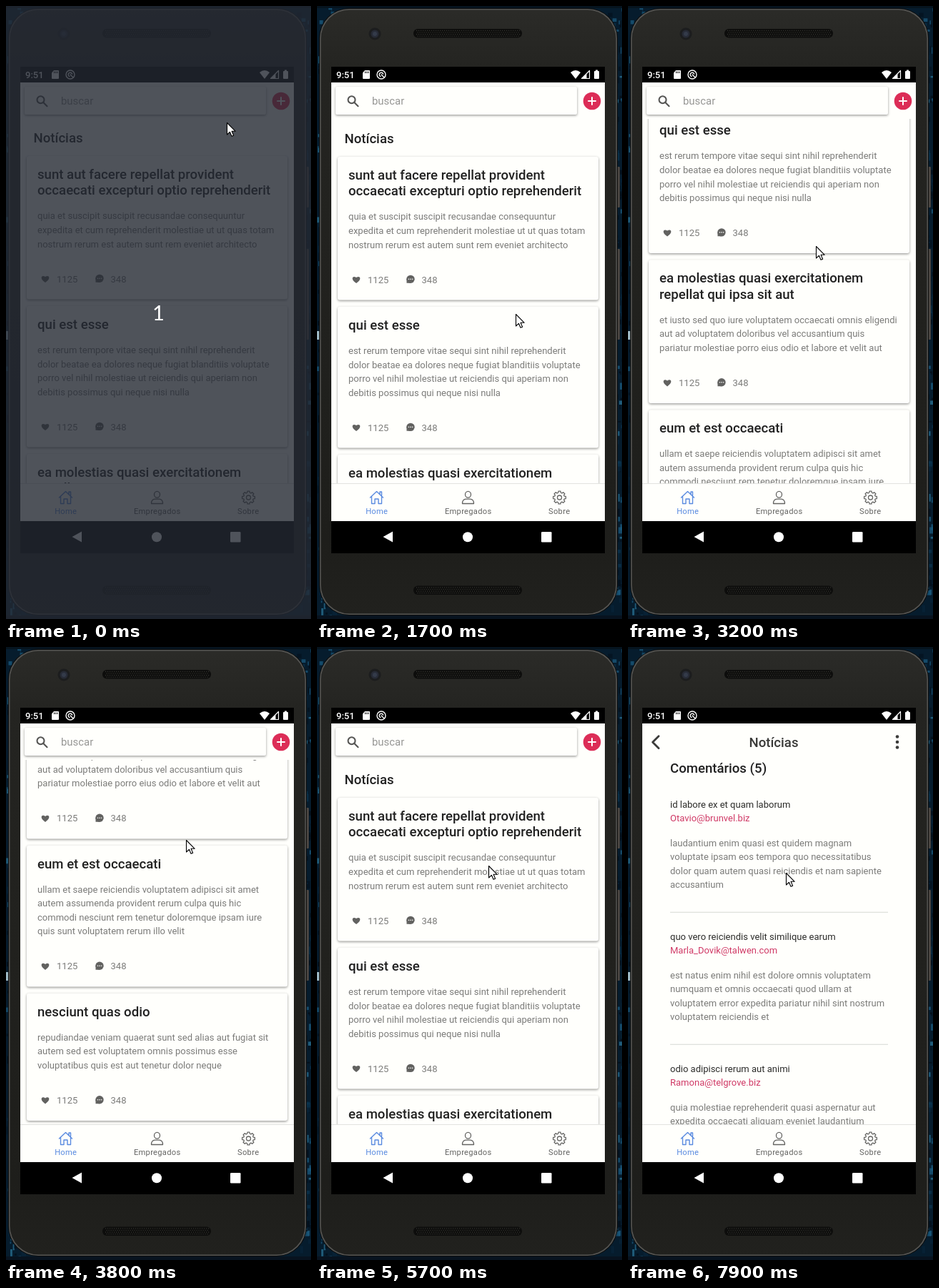
Recreate the animation shown at these times as an HTML page with a canvas. Size 427 by 858 pixels, loop 8000 ms.

```html
<!DOCTYPE html>
<html lang="pt">
<head>
<meta charset="utf-8">
<title>Notícias</title>
<style>
html, body { margin: 0; width: 100%; height: 100%; overflow: hidden; background: #051a2a; }
canvas { display: block; width: 427px; height: 858px; }
</style>
</head>
<body>
<canvas id="stage" width="427" height="858"></canvas>
<script>
const LOOP = 8000, STEP = 100;
const PAGE = '#fffffc', INK = '#212121', GREY = '#7b7b79', ICON = '#656563', PINK = '#d03a66', BLUE = '#5a8be0';
const BODY_LINE = 19.55, TITLE_LINE = 22.34;
const stage = document.getElementById('stage').getContext('2d');
let c = stage;

const posts = [
  ['sunt aut facere repellat provident|occaecati excepturi optio reprehenderit',
   'quia et suscipit suscipit recusandae consequuntur|expedita et cum reprehenderit molestiae ut ut quas totam|nostrum rerum est autem sunt rem eveniet architecto'],
  ['qui est esse',
   'est rerum tempore vitae sequi sint nihil reprehenderit|dolor beatae ea dolores neque fugiat blanditiis voluptate|porro vel nihil molestiae ut reiciendis qui aperiam non|debitis possimus qui neque nisi nulla'],
  ['ea molestias quasi exercitationem|repellat qui ipsa sit aut',
   'et iusto sed quo iure voluptatem occaecati omnis eligendi|aut ad voluptatem doloribus vel accusantium quis|pariatur molestiae porro eius odio et labore et velit aut'],
  ['eum et est occaecati',
   'ullam et saepe reiciendis voluptatem adipisci sit amet|autem assumenda provident rerum culpa quis hic|commodi nesciunt rem tenetur doloremque ipsam iure|quis sunt voluptatem rerum illo velit'],
  ['nesciunt quas odio',
   'repudiandae veniam quaerat sunt sed alias aut fugiat sit|autem sed est voluptatem omnis possimus esse|voluptatibus quis est aut tenetur dolor neque'],
  ['dolorem eum magni eos aperiam quia',
   'ut aspernatur corporis harum nihil quis provident sequi|mollitia nobis aliquid molestiae perspiciatis et ea nemo|ab reprehenderit accusantium quas voluptate dolores']
].map(p => p.map(s => s.split('|')));

const article = [
  ['sunt aut facere repellat', 'provident occaecati excepturi', 'optio reprehenderit'],
  ['quia et suscipit suscipit recusandae', 'consequuntur expedita et cum reprehenderit',
   'molestiae ut ut quas totam nostrum rerum est', 'autem sunt rem eveniet architecto']
];

const comments = [
  ['id labore ex et quam laborum', 'Otavio@brunvel.biz',
   'laudantium enim quasi est quidem magnam|voluptate ipsam eos tempora quo necessitatibus|dolor quam autem quasi reiciendis et nam sapiente|accusantium'],
  ['quo vero reiciendis velit similique earum', 'Marla_Dovik@talwen.com',
   'est natus enim nihil est dolore omnis voluptatem|numquam et omnis occaecati quod ullam at|voluptatem error expedita pariatur nihil sint nostrum|voluptatem reiciendis et'],
  ['odio adipisci rerum aut animi', 'Ramona@telgrove.biz',
   'quia molestiae reprehenderit quasi aspernatur aut|expedita occaecati aliquam eveniet laudantium|omnis quibusdam delectus saepe quia accusamus|maiores nam est']
];

// Key rows are [time, value, ...]; values between rows are linear.
const listKeys = [[0, 1], [1400, 1], [1500, 0], [2000, 0], [2400, 4], [2600, 4], [2700, 22], [2800, 52.5],
  [3000, 170], [3200, 272.5], [3500, 410], [3800, 560], [4000, 590], [4100, 570], [4200, 497.5],
  [4300, 230], [4400, 1.5], [4500, 1], [4700, 0]];
const pageKeys = [[7300, 0], [7900, 250]];
const mouseKeys = [[0, 309, 163], [800, 309, 163], [1700, 278, 431], [2000, 278, 431], [2400, 264, 540],
  [2600, 264, 540], [2800, 262, 491], [3000, 262, 400], [3200, 263, 336], [3500, 258, 300], [3800, 252, 270],
  [4100, 250, 290], [4200, 250, 361], [4300, 250, 600], [4400, 250, 806], [4600, 248, 806], [5200, 241, 459],
  [5300, 241, 459], [5700, 240, 306], [7000, 240, 306], [7100, 218, 310], [7200, 218, 310],
  [7300, 222, 566], [7900, 221, 316]];

function at(keys, t) {
  let i = 0;
  while (i < keys.length && keys[i][0] <= t) i++;
  if (i === 0) return keys[0].slice(1);
  if (i === keys.length) return keys[i - 1].slice(1);
  const a = keys[i - 1], b = keys[i], k = (t - a[0]) / (b[0] - a[0]);
  return a.slice(1).map((v, j) => v + (b[j + 1] - v) * k);
}

function seeded(seed) {
  return () => (seed = (seed * 16807) % 2147483647) / 2147483647;
}

function text(s, x, y, size, color, weight = 400, align = 'left', family = 'Roboto') {
  c.font = `${weight} ${size}px ${family}, sans-serif`;
  c.fillStyle = color;
  c.textAlign = align;
  c.fillText(s, x, y);
}
const lines = (list, x, y, pitch, draw) => list.forEach((s, i) => draw(s, x, y + i * pitch));
const heading = (s, x, y, align) => text(s, x, y, 18.6, INK, 500, align);
const copy = (s, x, y) => text(s, x, y, 13.03, GREY);

function rect(x, y, w, h, color) { c.fillStyle = color; c.fillRect(x, y, w, h); }
function round(x, y, w, h, r, color) {
  c.beginPath(); c.roundRect(x, y, w, h, r);
  c.fillStyle = color; c.fill();
}
function disc(x, y, r, color) {
  c.beginPath(); c.arc(x, y, r, 0, 7);
  c.fillStyle = color; c.fill();
}
function shape(d, color, x = 0, y = 0) {
  c.save(); c.translate(x, y);
  c.fillStyle = color; c.fill(new Path2D(d));
  c.restore();
}
function line(d, color, width, x = 0, y = 0) {
  c.save(); c.translate(x, y);
  c.strokeStyle = color; c.lineWidth = width;
  c.lineJoin = c.lineCap = 'round';
  c.stroke(new Path2D(d));
  c.restore();
}
function raised(x, y, w, h, r) {
  c.save();
  c.shadowColor = 'rgba(0,0,0,.42)'; c.shadowBlur = 3.5; c.shadowOffsetY = 1.3;
  round(x, y, w, h, r, PAGE);
  c.restore();
}

function scenery() {
  const rnd = seeded(77), tones = ['#0b3550', '#1c5f84', '#082439', '#030d18', '#2b789c', '#04121f'];
  rect(0, 0, 427, 858, '#061c2d');
  for (let i = 0; i < 420; i++) {
    const x = rnd() < .5 ? rnd() * 22 : 427 - rnd() * 22;
    c.globalAlpha = .7;
    rect(x, rnd() * 858, 1 + rnd() * 6, 2 + rnd() * 9, tones[Math.floor(rnd() * tones.length)]);
  }
  c.globalAlpha = 1;
  rect(0, 455, 3, 12, '#9fbac6');
  rect(0, 0, 427, 3, '#06141f');
  rect(0, 853, 427, 5, '#08131f');
}

function grille(y) {
  round(135, y, 152, 12.5, 6, '#0d0d0c');
  for (let r = 0; r < 4; r++)
    for (let x = 139 + (r % 2) * 1.5; x < 284; x += 3) rect(x, y + 1.8 + r * 2.6, 1.2, 1.2, '#34342f');
}

function phone() {
  round(419, 225, 5, 57, 1, '#4a4541');
  round(419, 340, 5, 127, 1, '#4a4541');
  round(3, 3, 418, 850, 42, '#0c0c0b');
  round(4, 4, 416, 848, 41, '#565654');
  const g = c.createLinearGradient(0, 4, 0, 852);
  g.addColorStop(0, '#2b2b28'); g.addColorStop(.1, '#242421');
  g.addColorStop(.88, '#1e1e1b'); g.addColorStop(1, '#21211e');
  round(5.5, 5.5, 413, 845, 40, g);
  disc(81, 39, 8.5, '#1c1d1e');
  disc(81, 39, 5.5, '#272b36');
  disc(81, 39, 3, '#343b4a');
  grille(32);
  grille(811.5);
  rect(20, 85, 383, 681, '#000');
}

function statusBar() {
  text('9:51', 27, 101, 13.03, '#fff', 500);
  shape('M3 0H9Q10 0 10 1V11Q10 12 9 12H1Q0 12 0 11V3.5Z', '#fff', 64, 90);
  [67, 69.2, 71.4].forEach(x => rect(x, 91.5, 1, 2.6, '#000'));
  line('M6 0A6 6 0 1 1-6 0A6 6 0 1 1 6 0M2.6-1A2.8 2.8 0 1 0-1 2.6M0 0L4 4', '#fff', 1.4, 90, 96);
  shape('M0 3Q7-3 14 3L7 12Z', '#fff', 355, 90);
  line('M0 11L11 0V11Z', '#fff', 1.2, 370.5, 90.5);
  shape('M0 11.5L7 4.5V11.5Z', '#fff', 370.5, 90.5);
  round(388, 91, 7, 11, 1, '#fff');
  rect(390, 89.5, 3, 2, '#fff');
}

function gear(x, y) {
  let d = '';
  for (let i = 0; i < 8; i++)
    [[-.27, 7], [-.17, 9], [.17, 9], [.27, 7]].forEach(([da, r]) => {
      const a = i * Math.PI / 4 + da;
      d += (d ? 'L' : 'M') + r * Math.cos(a) + ' ' + r * Math.sin(a);
    });
  line(d + 'ZM3 0A3 3 0 1 1-3 0A3 3 0 1 1 3 0', ICON, 1.3, x, y);
}

function tabs() {
  rect(20, 668, 383, 53, PAGE);
  rect(20, 668, 383, 1, '#e2e3e0');
  line('M-9 0L0-8.5L9 0M-7-1.5V8.5H-2.5V2H2.5V8.5H7V-1.5M4.5-4.5V-8H7V-2.2', BLUE, 1.4, 83.5, 688);
  line('M4-4.2A4 4.4 0 1 1-4-4.2A4 4.4 0 1 1 4-4.2M-8 8.5Q-8 2.5-3 2.2H3Q8 2.5 8 8.5Z', ICON, 1.3, 211.5, 688);
  gear(339.5, 688);
  c.letterSpacing = '0.28px';
  [['Home', 83.7, BLUE], ['Empregados', 211.7, ICON], ['Sobre', 339.2, ICON]]
    .forEach(([s, x, color]) => text(s, x, 711, 11.17, color, 400, 'center'));
  c.letterSpacing = '0px';
}

function navBar() {
  rect(20, 721, 383, 45, '#000');
  shape('M0 7.5L13.5 0V15Z', '#fff', 92.5, 735.5);
  disc(211, 743.3, 7, '#fff');
  round(314, 736, 14.5, 14.5, 1.2, '#fff');
}

function stats(x, y) {
  shape('M0 5C-9-1-5-6.5 0-3C5-6.5 9-1 0 5Z', '#626260', x + 11, y - 4.5);
  disc(x + 87, y - 5.2, 5.7, '#626260');
  shape('M-5.5-1V5.3H0Z', '#626260', x + 87, y - 5);
  [-2.6, 0, 2.6].forEach(d => disc(x + 87 + d, y - 5.2, .8, PAGE));
  copy('1125', x + 27, y);
  copy('348', x + 102.5, y);
}

function card([title, body], y) {
  const h = title.length * TITLE_LINE + body.length * BODY_LINE + 97.2;
  if (y < 700 && y + h > 100) {
    raised(29, y, 365, h, 3);
    lines(title, 44, y + 32, TITLE_LINE, heading);
    lines(body, 44, y + 43.8 + title.length * TITLE_LINE, BODY_LINE, copy);
    stats(44, y + h - 24);
  }
  return y + h + 9.3;
}

function clipped(top, draw) {
  c.save();
  c.beginPath(); c.rect(20, top, 383, 668 - top); c.clip();
  draw();
  c.restore();
}

function listPage(scroll) {
  rect(20, 107, 383, 561, PAGE);
  clipped(158, () => {
    heading('Notícias', 38.5, 191.5 - scroll);
    let y = 211 - scroll;
    posts.forEach(p => { y = card(p, y); });
  });
  raised(26, 113, 338, 39, 2);
  line('M5 0A5 5 0 1 1-5 0A5 5 0 1 1 5 0M4 4L9 9', '#555553', 2.1, 48.5, 131.2);
  text('buscar', 77, 137.5, 14.9, '#979795');
  disc(385, 133, 12.3, '#dc2d57');
  line('M-5 0H5M0-5V5', '#fff', 2, 385, 133);
}

function detailPage(scroll) {
  rect(20, 107, 383, 561, PAGE);
  line('M0 0L-8.5 8.5L0 17', '#3c3c3a', 2.8, 43, 124.8);
  text('Notícias', 204, 139.5, 18.6, '#3a3a38', 500, 'center');
  [125.5, 133, 140.5].forEach(y => disc(377, y, 2.3, '#3c3c3a'));
  clipped(158, () => {
    c.translate(0, -scroll);
    lines(article[0], 59, 184, TITLE_LINE, heading);
    lines(article[1], 59, 264, BODY_LINE, copy);
    stats(59, 366);
    heading('Comentários (5)', 59, 426);
    comments.forEach(([title, mail, body], i) => {
      const y = 474.7 + i * 185;
      text(title, 59, y, 13.03, '#2c2c2a');
      text(mail, 59, y + 19.5, 13.03, PINK);
      lines(body.split('|'), 59, y + 54, BODY_LINE, copy);
      rect(59, y + 146, 305, 1.2, '#dcdfda');
    });
  });
}

function pointer(x, y) {
  const d = 'M.5.5V17L4.4 13.3L7 19.3L9.6 18.2L7.1 12.3H12.2Z';
  shape(d, '#fff', x, y);
  line(d, '#000', 1.1, x, y);
}

const still = document.createElement('canvas');
still.width = 427; still.height = 858;
c = still.getContext('2d');
scenery();
phone();
c = stage;

function draw(t) {
  c.drawImage(still, 0, 0);
  statusBar();
  const fade = Math.min(1, Math.max(0, (t - 6200) / 300));
  if (fade < 1) listPage(at(listKeys, t)[0]);
  if (fade > 0) {
    c.globalAlpha = fade;
    detailPage(at(pageKeys, t)[0]);
    c.globalAlpha = 1;
  }
  tabs();
  navBar();
  if (t < 500) {
    rect(0, 0, 427, 858, 'rgba(36,41,51,.8)');
    text('1', 213.5, 440, 29, '#fff', 400, 'center', 'Lato');
  }
  pointer(...at(mouseKeys, t));
}

const start = performance.now();
function tick() {
  const t = (performance.now() - start) % LOOP;
  draw(Math.floor(t / STEP) * STEP);
  requestAnimationFrame(tick);
}
tick();
</script>
</body>
</html>
```
